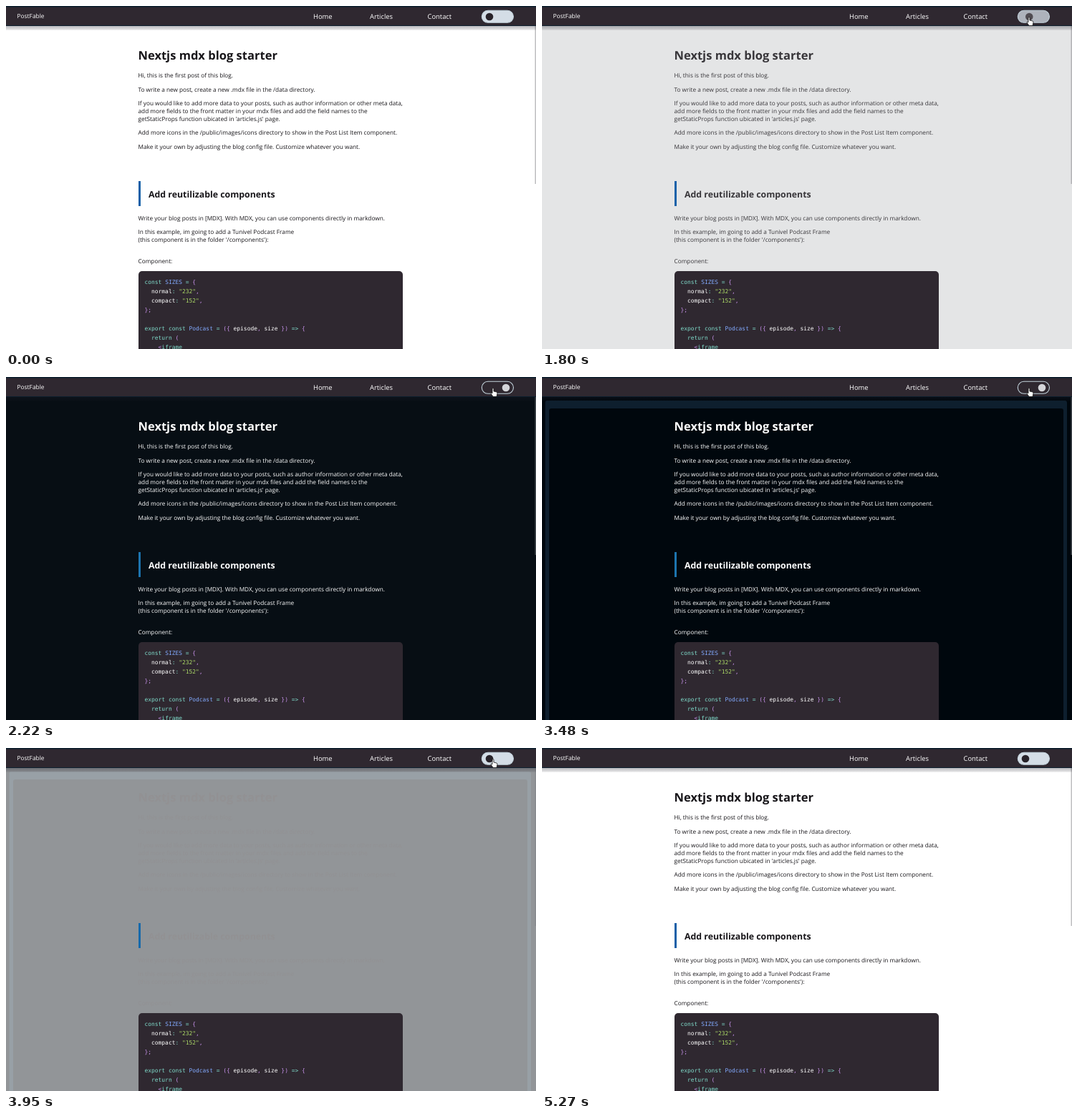
Animation, 740 px wide and 480 px high, one loop 5570 ms. Source, as an HTML page:

```html
<!DOCTYPE html>
<html lang="en">
<head>
<meta charset="utf-8">
<title>Blog theme toggle</title>
<style>
  html, body { margin: 0; width: 100%; height: 100%; overflow: hidden; }
  svg { display: block; width: 740px; height: 480px; }
  text { white-space: pre; text-rendering: geometricPrecision; font-family: "Open Sans", "Noto Sans", sans-serif; }
  #page { font-size: 8.26px; }
  #page .h1 { font-size: 16.55px; font-weight: 700; }
  #page .h2 { font-size: 12.33px; font-weight: 700; }
  #nav { font-size: 9.4px; fill: #fff; }
  #nav .brand { font-size: 8.4px; }
  #code text { font: 7.93px "DejaVu Sans Mono", monospace; fill: #fff; }
  .k { fill: #7fdbca; }
  .f { fill: #82aaff; }
  .p { fill: #c792ea; }
  .s { fill: #addb67; }
</style>
</head>
<body>
<svg viewBox="0 0 740 480">
  <defs>
    <linearGradient id="shade" x2="0" y2="1">
      <stop stop-color="#1c1c28" stop-opacity=".3"/>
      <stop offset=".7" stop-color="#1c1c28" stop-opacity=".16"/>
      <stop offset="1" stop-color="#1c1c28" stop-opacity=".04"/>
    </linearGradient>
  </defs>
  <rect id="bg" width="740" height="480"/>
  <path id="ring" fill-rule="evenodd" d="M4.5 490V36Q4.5 33 7 33H730Q733 33 733 36V490ZM10 490V47Q10 44 13 44H725Q728 44 728 47V490Z"/>
  <rect id="thumb" x="738.5" y="10" width="1.5" height="239"/>
  <rect y="28" width="740" height="6" fill="url(#shade)"/>

  <g id="nav">
    <rect width="740" height="28" fill="#0c1f2e"/>
    <rect y="1.5" width="740" height="25.5" fill="#2f2830"/>
    <text class="brand" x="15.5" y="17">PostFable</text>
    <text x="429" y="17.5">Home</text>
    <text x="508" y="17.5">Articles</text>
    <text x="588.5" y="17.5">Contact</text>
    <rect id="pill" x="664.3" y="6.3" width="44.2" height="17" rx="8.5" stroke="#c3d3dc" stroke-width="1.1"/>
    <circle id="knob" cy="15" r="5.3"/>
  </g>

  <g id="page">
    <text class="h1" x="184.5" y="75">Nextjs mdx blog starter</text>
    <text x="184.5" y="100">Hi, this is the first post of this blog.</text>
    <text x="184.5" y="119.6">To write a new post, create a new .mdx file in the /data directory.</text>
    <text x="184.5" y="139">If you would like to add more data to your posts, such as author information or other meta data,</text>
    <text x="184.5" y="150">add more fields to the front matter in your mdx files and add the field names to the</text>
    <text x="184.5" y="161">getStaticProps function ubicated in 'articles.js' page.</text>
    <text x="184.5" y="180.4">Add more icons in the /public/images/icons directory to show in the Post List Item component.</text>
    <text x="184.5" y="200">Make it your own by adjusting the blog config file. Customize whatever you want.</text>
    <text class="h2" x="199" y="268.3">Add reutilizable components</text>
    <text x="184.5" y="299.6">Write your blog posts in [MDX]. With MDX, you can use components directly in markdown.</text>
    <text x="184.5" y="319.2">In this example, im going to add a Tunivel Podcast Frame</text>
    <text x="184.5" y="330.2">(this component is in the folder '/components'):</text>
    <text x="184.5" y="360.4">Component:</text>
  </g>
  <rect id="bar" x="185" y="245" width="3" height="35"/>

  <g id="code">
    <rect x="185" y="371" width="369" height="120" rx="5" fill="#2f2830"/>
    <text x="193.5" y="389"><tspan class="k">const</tspan> <tspan class="f">SIZES</tspan> <tspan class="k">=</tspan> <tspan class="p">{</tspan></text>
    <text x="193.5" y="402">  normal<tspan class="k">:</tspan> <tspan class="s">"232"</tspan><tspan class="p">,</tspan></text>
    <text x="193.5" y="415">  compact<tspan class="k">:</tspan> <tspan class="s">"152"</tspan><tspan class="p">,</tspan></text>
    <text x="193.5" y="428"><tspan class="p">};</tspan></text>
    <text x="193.5" y="454"><tspan class="k">export const</tspan> <tspan class="f">Podcast</tspan> <tspan class="k">=</tspan> <tspan class="p">({</tspan> episode<tspan class="p">,</tspan> size <tspan class="p">})</tspan> <tspan class="k">=></tspan> <tspan class="p">{</tspan></text>
    <text x="193.5" y="467">  <tspan class="k">return</tspan> <tspan class="p">(</tspan></text>
    <text x="193.5" y="480">    <tspan class="p">&lt;</tspan><tspan class="k">iframe</tspan></text>
  </g>

  <path id="cursor" fill="#fff" stroke="#111" stroke-width=".8" stroke-linejoin="round"/>
</svg>
<script>
const LOOP = 5570;
const ARROW = "M0 0V11L2.6 8.6 4.3 12.4 6 11.6 4.4 8H8Z";
const HAND = "M-1 .2Q0-1.2 1 .2V4L5 5Q6 5.4 6 7L5 11.5H0L-3 7Q-3 5.6-1.6 6.2L-1 6.8Z";
// time, x, y of the pointer tip
const PATH = [
  [490, 741, 130], [760, 712, 56], [1030, 684, 18],
  [1180, 680, 16], [4890, 680, 16], [5270, 687, -14]
];

const $ = id => document.getElementById(id);
const ramp = (t, a, b) => Math.min(1, Math.max(0, (t - a) / (b - a)));
const mix = (a, b, p) => a + (b - a) * p;
const blend = (a, b, p) => `rgb(${a.map((v, i) => Math.round(mix(v, b[i], p)))})`;
const paint = (id, light, dark, p) => $(id).setAttribute("fill", blend(light, dark, p));

function drawCursor(t) {
  const i = PATH.findIndex(k => t < k[0]);
  const cursor = $("cursor");
  cursor.style.display = i > 0 ? "" : "none";
  if (i < 1) return;
  const [t0, x0, y0] = PATH[i - 1], [t1, x1, y1] = PATH[i];
  const p = ramp(t, t0, t1), x = mix(x0, x1, p), y = mix(y0, y1, p);
  const onToggle = x > 664 && x < 709 && y > 6 && y < 23;
  cursor.setAttribute("d", onToggle ? HAND : ARROW);
  cursor.setAttribute("transform", `translate(${x} ${y})`);
}

function draw(t) {
  const dark = ramp(t, 1750, 2235) - ramp(t, 3710, 4130);
  const on = ramp(t, 1755, 1955) - ramp(t, 3700, 3860);
  const ink = 1 - (1 - dark) ** 1.35;
  paint("bg", [255, 255, 255], [0, 7, 13], dark);
  paint("ring", [255, 255, 255], [14, 31, 46], dark);
  paint("page", [24, 22, 26], [255, 255, 255], ink);
  paint("bar", [20, 96, 168], [28, 116, 174], dark);
  paint("thumb", [190, 190, 192], [62, 68, 74], dark);
  paint("pill", [212, 221, 230], [47, 40, 48], on);
  paint("knob", [40, 35, 42], [212, 213, 217], on);
  $("ring").style.display = t >= 3480 && t < 4130 ? "" : "none";
  $("knob").setAttribute("cx", mix(675, 698, on));
  drawCursor(t);
}

const start = performance.now();
function tick() {
  draw((performance.now() - start) % LOOP);
  requestAnimationFrame(tick);
}
tick();
</script>
</body>
</html>
```
